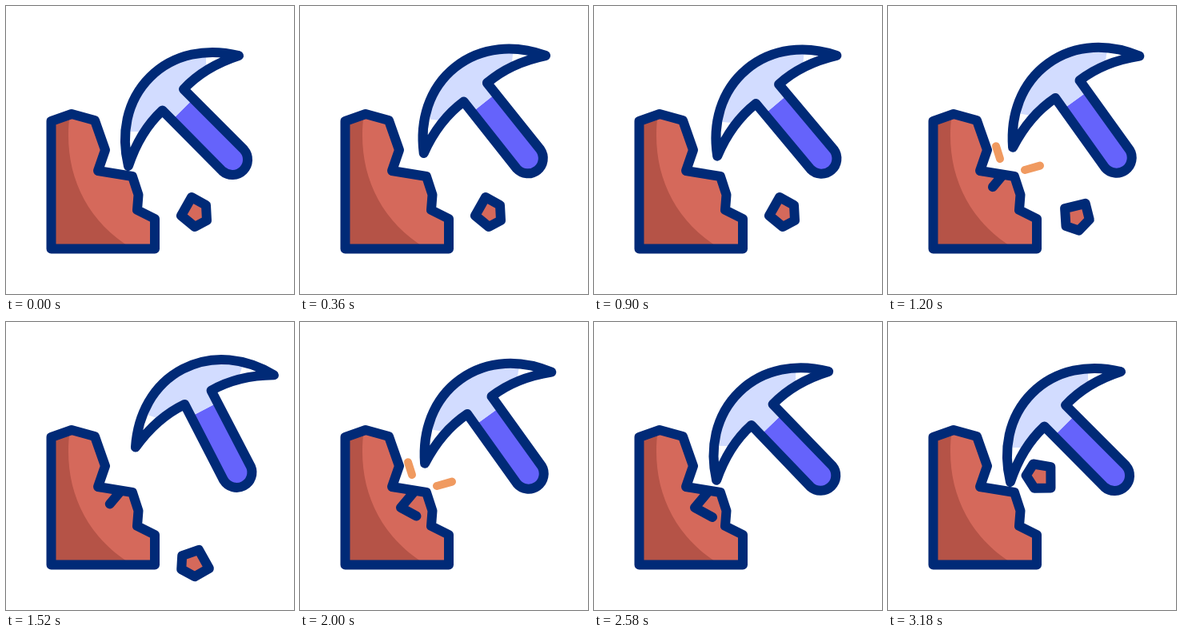
Animation, 360 px wide and 360 px high, one loop 3200 ms. Source, as an HTML page:

```html
<!DOCTYPE html>
<html lang="en">
<head>
<meta charset="utf-8">
<title>Pickaxe</title>
<style>
  html, body { margin: 0; width: 100%; height: 100%; overflow: hidden; background: #fff; }
  svg { display: block; width: 100vw; height: 100vh; }
  .line { fill: none; stroke: #002a77; stroke-width: 12; stroke-linecap: round; stroke-linejoin: round; }
  .spark { fill: none; stroke: #f09a60; stroke-width: 10; stroke-linecap: round; }
</style>
</head>
<body>
<svg viewBox="0 0 360 360">
  <defs>
    <path id="rock" d="M56.5 303.5V144L82 135L111 143L124 180L115 206L158 213L165.500 236L164 255L186 266V303.500Z"/>
    <path id="head" d="M291 62C252 52.500 210 59 180 89C150 119 143.500 161 153 200Q167 157 195.500 130.500L207 143L234 116L222 104Q248 76 291 62Z"/>
    <path id="tool" d="M291 62C252 52.500 210 59 180 89C150 119 143.500 161 153 200Q167 157 195.500 130.500L270.600 206.400A19 19 0 0 0 297.400 179.600L222 104Q248 76 291 62Z"/>
    <clipPath id="inRock"><use href="#rock"/></clipPath>
    <clipPath id="inHead"><use href="#head"/></clipPath>
  </defs>

  <use href="#rock" fill="#d5695b"/>
  <path clip-path="url(#inRock)" fill="#b55347" d="M50 130H80.500C69.500 200 94.500 265 157.500 303V310H50Z"/>
  <use href="#rock" class="line"/>
  <path id="crack" class="line" d="M142 213L126 232L148 244"/>

  <path id="stone" class="line" style="fill:#d5695b" d="M-4-18.500L14-8.500L15 10.500L0 18.500L-17 4.500Z"/>

  <path id="sparkA" class="spark" d="M140 191L134.500 173.500"/>
  <path id="sparkB" class="spark" d="M171 205L192 199"/>

  <g id="pick">
    <use href="#tool" fill="#6563fb"/>
    <use href="#head" fill="#fff"/>
    <rect clip-path="url(#inHead)" x="130" y="40" width="120" height="117" fill="#d2dcff"/>
    <use href="#tool" class="line"/>
  </g>
</svg>
<script>
const LOOP = 3200, START = 220, HALF = 400, SWING = 21.2;
const HITS = [1020, 1820, 2620];
const el = id => document.getElementById(id);
const clamp = x => Math.min(1, Math.max(0, x));
const ease = x => x * (0.2 + 2.4 * x - 1.6 * x * x);
const show = (node, on) => node.style.display = on ? '' : 'none';

const pick = el('pick'), stone = el('stone'), crack = el('crack');
const sparks = [el('sparkA'), el('sparkB')];

// Show the part of a path between two fractions of its length.
function trim(path, from, to) {
  const len = path.getTotalLength();
  show(path, to - from > 0.01);
  path.style.strokeDasharray = `0 ${from * len} ${(to - from) * len} ${len * 2}`;
}

function swing(t) {
  if (t < START || t > HITS[2]) return 0;
  const u = (t - START) / HALF % 2;
  return SWING * ease(u < 1 ? u : 2 - u);
}

// Hangs, drops after the first hit, then a new chip flies out after the third.
function stonePose(t) {
  if (t < 1000) return [236, 257.5, 0];
  if (t < HITS[1]) {
    const d = t - 1000;
    return [236, 257.5 + 44.1 * (d / 520) ** 2.3, 0.233 * d];
  }
  if (t < HITS[2]) return null;
  const p = (t - HITS[2]) / 1120;
  return [145.5 + 90.5 * p, 228 + 29.5 * p - 197 * p * (1 - p), 300 * p];
}

function draw(t) {
  pick.setAttribute('transform', `rotate(${swing(t)} 299 207.5)`);

  const pose = stonePose(t);
  show(stone, pose);
  if (pose) stone.setAttribute('transform', `translate(${pose[0]} ${pose[1]}) rotate(${pose[2]})`);

  const grown = 0.38 * clamp((t - HITS[0]) / 200) + 0.62 * clamp((t - HITS[1]) / 200);
  trim(crack, 0, t < HITS[2] ? grown : 0);

  const hit = HITS.findLast(h => h <= t);
  const u = hit ? (t - hit) / 200 : 0;
  for (const s of sparks) trim(s, clamp(u - 1), clamp(u));
}

function tick() {
  draw(performance.now() % LOOP);
  requestAnimationFrame(tick);
}
tick();
</script>
</body>
</html>
```
